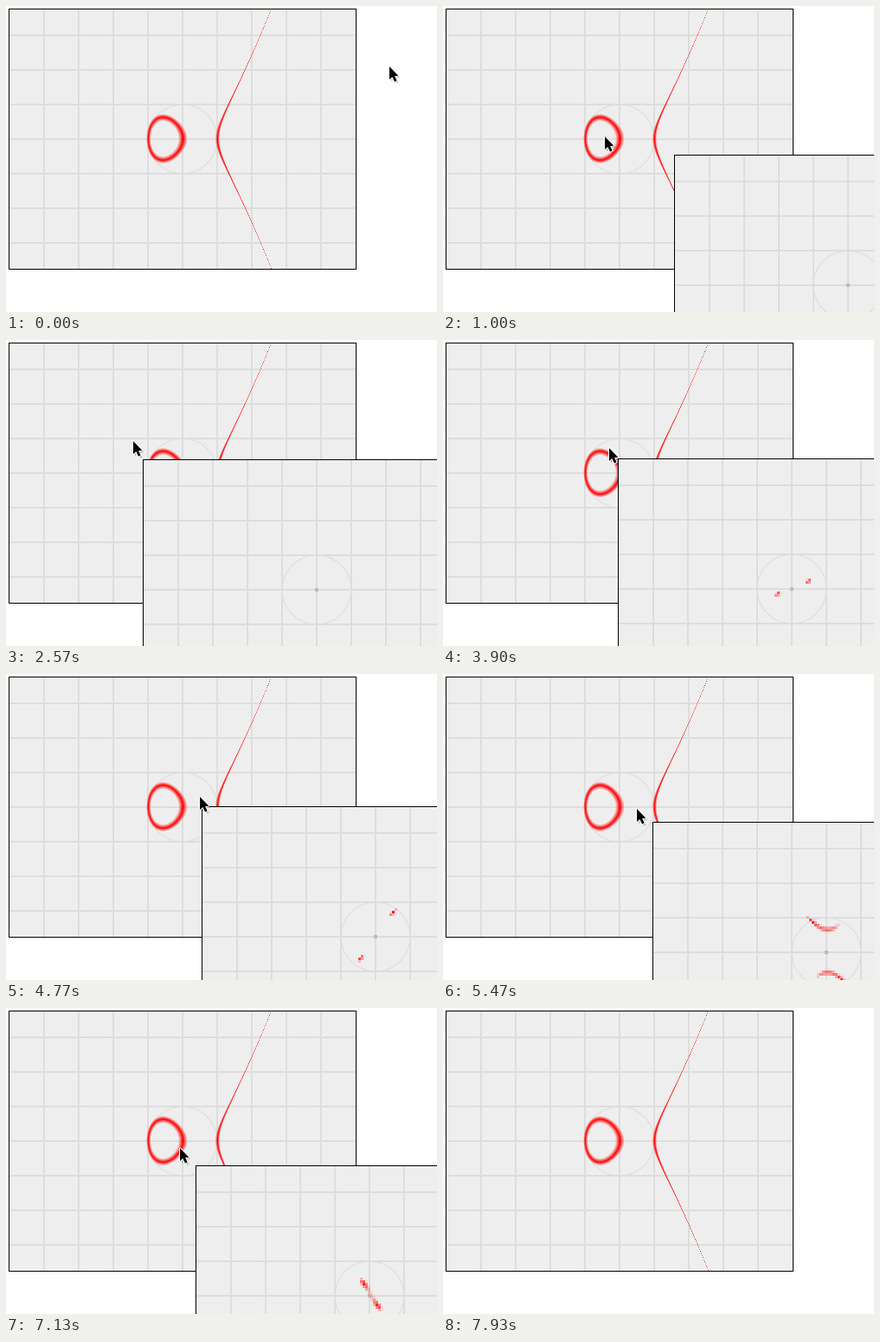
Animation, 498 px wide and 354 px high, one loop 8410 ms. Source, as a matplotlib script:

```python
import numpy as np
import matplotlib.pyplot as plt
from matplotlib.animation import FuncAnimation
from matplotlib.patches import Polygon

W, H, DPI = 498, 354, 64
PW, PH, UNIT, CELL = 400, 300, 40, 3
FRAMES, INTERVAL = 290, 29
RED = np.array([255, 0, 0])

# pointer waypoints: time in ms without the pause, x, y
PATH = np.array([
    (30, 443, 70), (700, 252, 156), (800, 187, 151), (1630, 151, 124),
    (2266, 143, 122), (2366, 147, 117), (3600, 187, 121), (3700, 192, 125),
    (4470, 211, 137), (4570, 224, 142), (5100, 229, 154), (5891, 206, 163),
    (5991, 200, 162), (6900, 204, 166), (7715, 66, 0),
])
PAUSE_START, PAUSE_END, PAUSE = 740, 1000, 200
LAG = 100

ARROW = np.array([(0, 0), (0, 15), (3.4, 12), (6, 17.6), (8.6, 16.4),
                  (6.1, 11), (10.4, 10.7)])


def strength(x, y):
    """How closely (x, y) satisfies y^2 = x^3 - x."""
    return np.clip(1 - np.abs(y * y - x ** 3 + x) / 0.13, 0, 1)


def tint(area, amount):
    return area + (RED - area) * amount[..., None]


def blank_panel():
    inner = np.full((PH, PW, 3), 238.0)
    for x in range(UNIT, PW, UNIT):
        inner[:, x - 1:x + 1] = 221
    for y in range(PH // 2 % UNIT, PH, UNIT):
        inner[y - 1:y + 1] = 221
    rows, cols = np.mgrid[:PH, :PW] + 0.5
    radius = np.hypot(cols - PW / 2, rows - PH / 2)
    ring = np.clip(1.2 - np.abs(radius - UNIT), 0, 1)[..., None]
    inner = np.minimum(inner, 238 - 14 * ring)
    cy, cx = PH // 2, PW // 2
    inner[cy - 2:cy + 2, cx - 2:cx + 2] = 187
    return inner


def framed(inner):
    return np.pad(inner, ((1, 1), (1, 1), (0, 0)))


def real_panel():
    rows, cols = np.mgrid[:PH, :PW]
    x = (cols - PW / 2) / UNIT
    y = (PH / 2 - rows - 1) / UNIT
    return framed(tint(BLANK, strength(x, y)))


def imaginary_panel(px, py):
    """Imaginary parts of the solutions whose real parts lie at the pointer."""
    rows, cols = np.mgrid[:PH:CELL, :PW:CELL]
    x = (px - 204) / UNIT + 1j * (cols - PW / 2) / UNIT
    y = (153 - py) / UNIT - 1j * (PH / 2 - rows - CELL) / UNIT
    amount = np.kron(strength(x, y), np.ones((CELL, CELL)))[:PH, :PW]
    return framed(tint(BLANK, amount))


def place(stage, panel, left, top):
    visible = stage[top:top + PH + 2, left:left + PW + 2]
    h, w = visible.shape[:2]
    visible[:] = panel[:h, :w]


def pointer_at(s):
    return [int(round(np.interp(s, PATH[:, 0], PATH[:, k]))) for k in (1, 2)]


BLANK = blank_panel()
BACKDROP = np.full((H, W, 3), 255.0)
place(BACKDROP, real_panel(), 3, 3)

fig = plt.figure(figsize=(W / DPI, H / DPI), dpi=DPI)
ax = fig.add_axes([0, 0, 1, 1])
ax.axis("off")
picture = ax.imshow(BACKDROP.astype(np.uint8), extent=(0, W, H, 0),
                    interpolation="nearest", aspect="auto")
ax.set(xlim=(0, W), ylim=(H, 0))
shadow = ax.add_patch(Polygon(ARROW, fc="black", ec="none", alpha=0.25))
halo = ax.add_patch(Polygon(ARROW, fc="white", ec="white", lw=2 * 72 / DPI))
pointer = ax.add_patch(Polygon(ARROW, fc="black", ec="none"))


def update(frame):
    t = frame * INTERVAL + INTERVAL // 2
    s = min(t, PAUSE_START) if t < PAUSE_END else t - PAUSE
    present = s < PATH[-1, 0]
    tip = pointer_at(s)
    px, py = pointer_at(s - LAG)
    stage = BACKDROP.copy()
    if present and px < 404:
        place(stage, imaginary_panel(px, py), px + 15, py + 16)
    picture.set_data(stage.round().astype(np.uint8))
    for patch, shift in ((pointer, 0), (halo, 0), (shadow, 2)):
        patch.set_xy(ARROW + tip + shift)
        patch.set_visible(present)
    return picture, shadow, halo, pointer


animation = FuncAnimation(fig, update, frames=FRAMES, interval=INTERVAL,
                          repeat=True, repeat_delay=0, blit=False)
plt.show()
```
